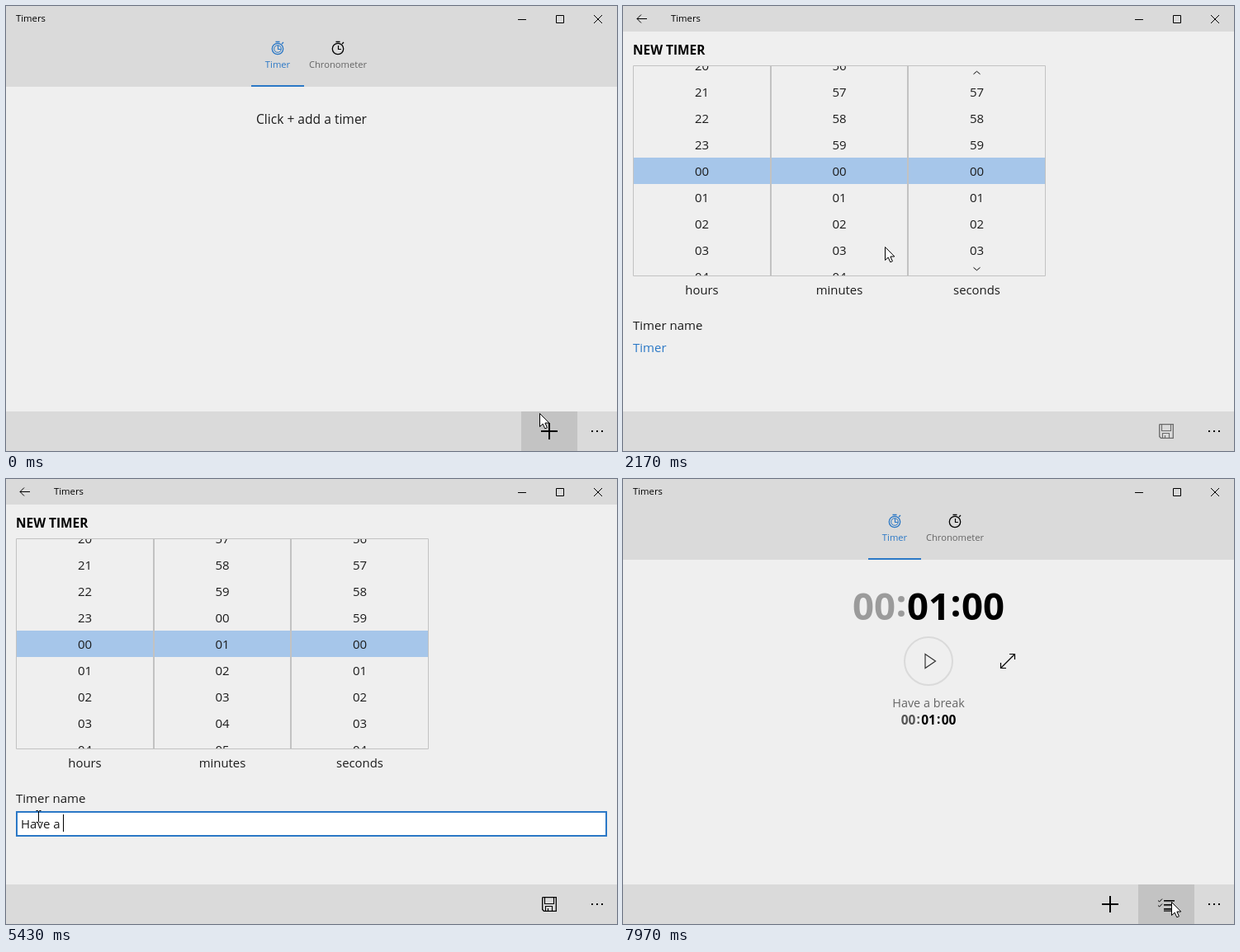
Recreate the animation shown at these times as an HTML page with a canvas. Size 740 px wide and 540 px high, loop 8 s.

```html
<!DOCTYPE html>
<html lang="en">
<head>
<meta charset="utf-8">
<title>Timers</title>
<style>
  html, body { margin: 0; width: 100%; height: 100%; overflow: hidden; background: #efefef; }
  canvas { display: block; }
</style>
</head>
<body>
<canvas id="stage" width="740" height="540"></canvas>
<script>
const ctx = document.getElementById('stage').getContext('2d');
const LOOP = 8000;
const INK = '#000', TEXT = '#1c1c1c', DIM = '#666', ACCENT = '#2b78c6';
const PAGE = '#efefef', BAR = '#dadada', HOVER = '#c3c3c3', PRESSED = '#b0b0b0', EDGE = '#c2c2c2';

// Moments at which the screen changes
const PRESS_NEW = 1100, OPEN_FORM = 1300, SCROLL = 2630, FOCUS = 3400, SELECT = 4230;
const LEAVE_FIELD = 6800, PRESS_SAVE = 7830, SAVED = 7970;

const NAME = 'Have a break';
const KEY_TIMES = [4700, 4800, 4970, 5070, 5200, 5330, 5430, 5730, 5830, 5900, 6000, 6370];

// Pointer path: time, x, y
const PATH = [
  [0, 646, 494], [30, 647, 497], [100, 650, 504], [1450, 650, 504], [1830, 453, 438],
  [2050, 453, 438], [2170, 317, 292], [2270, 288, 272], [2470, 270, 262], [2850, 270, 262],
  [2900, 206, 307], [3010, 105, 367], [3170, 37, 407], [LEAVE_FIELD, 37, 407],
  [7000, 630, 489], [7080, 672, 541], [7350, 728, 541], [7450, 696, 526], [7630, 664, 513]
];

const clamp = v => Math.max(0, Math.min(1, v));
const between = (t, a, b) => t >= a && t < b;

function pointerAt(t) {
  const i = PATH.findIndex(p => p[0] > t);
  if (i < 0) return PATH[PATH.length - 1].slice(1);
  const [t0, x0, y0] = PATH[i - 1], [t1, x1, y1] = PATH[i];
  const k = (t - t0) / (t1 - t0);
  return [Math.round(x0 + (x1 - x0) * k), Math.round(y0 + (y1 - y0) * k)];
}

function rect(x, y, w, h, color) {
  ctx.fillStyle = color;
  ctx.fillRect(x, y, w, h);
}

function text(str, x, y, size, color = TEXT, align = 'left', weight = 400) {
  ctx.font = `${weight} ${size}px "Open Sans", "Noto Sans", sans-serif`;
  ctx.textAlign = align;
  ctx.fillStyle = color;
  ctx.fillText(str, x, y);
}

function path(d, color = INK, width = 1, fill) {
  const shape = new Path2D(d);
  if (fill) {
    ctx.fillStyle = fill;
    ctx.fill(shape);
  }
  ctx.strokeStyle = color;
  ctx.lineWidth = width;
  ctx.stroke(shape);
}

function circle(x, y, r, color, width) {
  ctx.beginPath();
  ctx.arc(x, y, r, 0, 2 * Math.PI);
  ctx.strokeStyle = color;
  ctx.lineWidth = width;
  ctx.stroke();
}

function at(x, y, draw) {
  ctx.save();
  ctx.translate(x, y);
  draw();
  ctx.restore();
}

function windowButtons() {
  path('M620 16.5H630 M666.5 11.5H675.5V20.5H666.5Z M712 11L722 21 M722 11L712 21');
}

function bottomBar(buttonColor, moreColor = BAR) {
  rect(0, 492, 740, 48, BAR);
  rect(624, 492, 68, 48, buttonColor);
  rect(692, 492, 48, 48, moreColor);
  for (const x of [709, 715, 721]) rect(x, 515, 2, 2, INK);
}

function plus(x) {
  rect(x - 10, 515, 20, 2, INK);
  rect(x - 1, 506, 2, 20, INK);
}

function stopwatch(x, color, doubled) {
  at(x, 52, () => {
    circle(0, 0, 6.7, color, 1.3);
    if (doubled) circle(0, 0, 4.3, color, 1);
    path('M-2.5 -8.5H2.5 M5 -6L7 -8', color, 1.3);
    path('M0.5 -4V0.5H4', color, 1.2);
  });
}

function saveIcon(color) {
  path('M649.7 508.5Q649.7 507.7 650.5 507.7H666.3V524.3H651.5L649.7 522.5Z', color, 1.3);
  path('M652.5 508V515.5H663.5V508 M653.5 524V518.5H661.5V524 M656.5 521V524', color, 1.1);
}

function listIcon() {
  for (const y of [511, 516, 521]) rect(655, y, 13, 1.6, INK);
  rect(655, 523.5, 10, 1.2, INK);
  path('M648 511.5L649.7 513L653 509.5 M648 517.5L649.7 519L653 515.5', INK, 1);
}

function mainHeader() {
  rect(0, 0, 740, 540, PAGE);
  rect(0, 0, 740, 98, BAR);
  text('Timers', 12, 19, 11.3, INK);
  windowButtons();
  stopwatch(329, ACCENT, true);
  stopwatch(402, INK, false);
  text('Timer', 329, 75, 11.2, ACCENT, 'center');
  text('Chronometer', 402, 75, 11.2, DIM, 'center');
  rect(297, 96, 64, 2, ACCENT);
}

function tooltip(alpha) {
  if (alpha <= 0) return;
  ctx.globalAlpha = alpha;
  rect(654, 529, 36, 11, 'rgba(0,0,0,.35)');
  rect(650, 524, 37, 16, '#a0a0a0');
  rect(651, 525, 35, 15, '#f0f0f0');
  text('New', 656, 538, 11.4, '#555');
  ctx.globalAlpha = 1;
}

function emptyPage(t) {
  mainHeader();
  text('Click + add a timer', 370, 143, 15.6, TEXT, 'center');
  bottomBar(t < PRESS_NEW ? HOVER : PRESSED);
  plus(658);
  tooltip(t < PRESS_NEW ? clamp((t - 580) / 250) : clamp(1 - (t - PRESS_NEW) / 220));
}

function clock(y, size, pitch, lift, faded) {
  ['00', ':', '01', ':', '00'].forEach((part, i) => {
    const raise = i % 2 ? lift : 0;
    text(part, 370 + (i - 2) * pitch / 2, y - raise, size, i < 2 ? faded : INK, 'center', 700);
  });
}

function savedPage() {
  mainHeader();
  clock(171, 45.5, 66, 4, '#9b9b9b');
  circle(370, 221, 29, BAR, 2);
  path('M366 212.5L378.5 221L366 229.5Z', '#333', 1.2);
  path('M457.5 229.5L474.5 212.5 M468 212.5H474.5V219 M457.5 223V229.5H464', INK, 1.2);
  text(NAME, 370, 277, 14.4, DIM, 'center');
  clock(298, 15.5, 24.5, 1.5, '#555');
  bottomBar(HOVER);
  plus(590);
  listIcon();
}

function column(index, value, count, hovered, hoverRow) {
  const left = [13, 180, 346][index], width = [165, 164, 165][index];
  const center = [95.5, 262, 428.5][index];
  if (hovered && hoverRow) rect(left, 200 + hoverRow * 32 - 16, width, 32, BAR);
  rect(left, 184, width, 32, '#a6c6ea');
  ctx.save();
  ctx.beginPath();
  ctx.rect(left, 73, width, 254);
  ctx.clip();
  const reach = hovered ? 3 : 4;
  for (let row = -reach; row <= reach; row++) {
    const number = (value + row + count) % count;
    text(String(number).padStart(2, '0'), center, 206 + row * 32, 15, TEXT, 'center');
  }
  ctx.restore();
  if (hovered) {
    at(center, 81, () => path('M-4 1.7L0 -1.7L4 1.7'));
    at(center, 319, () => path('M-4 -1.7L0 1.7L4 -1.7'));
  }
  text(['hours', 'minutes', 'seconds'][index], center, 350, 14.9, TEXT, 'center');
}

function picker(t) {
  const hovered = [between(t, 2930, 3060), between(t, 2210, 2930), between(t, 2100, 2210)];
  column(0, 0, 24, hovered[0], 0);
  column(1, t < SCROLL ? 0 : 1, 60, hovered[1], t < 2260 ? 3 : 2);
  column(2, 0, 60, hovered[2], 0);
  path('M12.5 72.5H511.5V327.5H12.5Z', EDGE);
  rect(178, 72, 2, 256, EDGE);
  rect(344, 72, 2, 256, EDGE);
}

function nameField(t) {
  text('Timer name', 12, 393, 15);
  if (t < FOCUS || t >= PRESS_SAVE) {
    text(t < FOCUS ? 'Timer' : NAME, 12, 420, 15, ACCENT);
    return;
  }
  rect(12, 403, 716, 31, ACCENT);
  rect(14, 405, 712, 27, '#fff');
  const typed = KEY_TIMES.filter(k => k <= t).length;
  const selected = t >= SELECT && !typed;
  const value = typed ? NAME.slice(0, typed) : 'Timer';
  if (selected) rect(18, 407, 40, 21, ACCENT);
  text(value, 18, 424, 15, selected ? '#fff' : TEXT);
  const lastEdit = typed ? KEY_TIMES[typed - 1] : FOCUS;
  if (!selected && (t - lastEdit) % 1000 < 500) {
    rect(18 + Math.floor(ctx.measureText(value).width), 407, 1, 21, INK);
  }
}

function formPage(t) {
  rect(0, 0, 740, 540, PAGE);
  const arrival = clamp((t - OPEN_FORM) / 350);
  at(0, 120 * (1 - arrival) ** 4, () => {
    ctx.globalAlpha = clamp(arrival * 3);
    text('NEW TIMER', 12, 59, 15.4, INK, 'left', 700);
    picker(t);
    nameField(t);
  });
  rect(0, 0, 740, 31, BAR);
  path('M17 15.5H29 M22 10.5L17 15.5L22 20.5');
  text('Timers', 58, 19, 11.3, INK);
  windowButtons();
  const onMore = between(t, 7370, 7470);
  const saveColor = t >= PRESS_SAVE ? PRESSED : t >= 7010 && !onMore ? HOVER : BAR;
  bottomBar(saveColor, onMore ? HOVER : BAR);
  saveIcon(t < SCROLL ? '#6a6a6a' : INK);
}

function pointer(t) {
  const [x, y] = pointerAt(t);
  if (between(t, FOCUS, LEAVE_FIELD + 25)) {
    at(x, y, () => path('M-0.5 -4.5H1.5L2.5 -3.5L3.5 -4.5H5.5 M2.5 -3.5V8.5 M-0.5 9.5H1.5L2.5 8.5L3.5 9.5H5.5'));
  } else {
    at(x + .5, y + .5, () => path('M0 0V16L3.7 12.6L6.3 18.3L8.9 17.2L6.4 11.5H11.3Z', INK, 1, '#fff'));
  }
}

function frame() {
  const t = performance.now() % LOOP;
  if (t < OPEN_FORM) emptyPage(t);
  else if (t < SAVED) formPage(t);
  else savedPage();
  pointer(t);
  requestAnimationFrame(frame);
}
frame();
</script>
</body>
</html>
```
